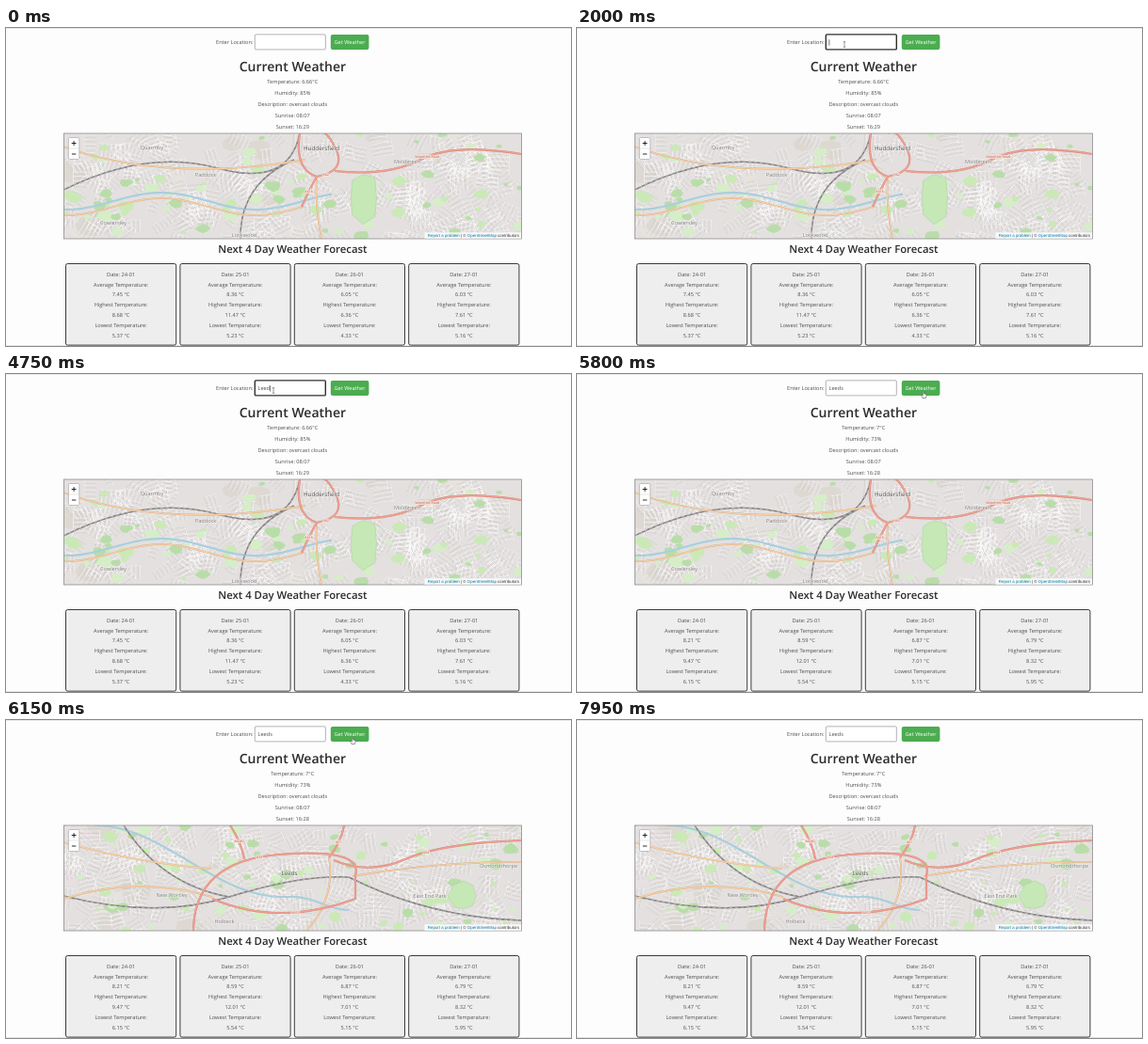
An HTML page for the animation above (8000 ms loop, 600 by 338 pixels).

```html
<!DOCTYPE html>
<html lang="en">
<head>
<meta charset="utf-8">
<title>Weather forecast</title>
<style>
html, body { margin: 0; width: 100%; height: 100%; overflow: hidden; background: #fefdfe; }
svg { display: block; width: 100vw; height: 100vh; }
text { font-family: "Open Sans", "Noto Sans", sans-serif; font-size: 5.65px; fill: #505050; text-rendering: geometricPrecision; }
.mid { text-anchor: middle; }
.head { font-weight: 600; fill: #2b2b2b; }
.place { font-size: 5.6px; fill: #777; stroke: #f4f2f1; stroke-width: .9px; paint-order: stroke; }
.city { font-size: 6.3px; fill: #444; }
.tag { font-size: 3.6px; fill: #a35b50; stroke: #fbe3da; stroke-width: 1.6px; paint-order: stroke; }
.credit { font: 4.4px "Liberation Sans", Arial, sans-serif; fill: #333; }
.link { fill: #0078a8; }
</style>
</head>
<body>
<svg id="stage" viewBox="0 0 600 338" preserveAspectRatio="none">
  <defs><clipPath id="mapClip"><rect x="61.5" y="112" width="486" height="112"/></clipPath></defs>
  <path d="M0 .4H600M0 337.5H600" stroke="#dedede" stroke-width=".8"/>
  <text x="223" y="17.3">Enter Location:</text>
  <rect id="field" x="264.3" y="6.9" width="75" height="16" rx="1" fill="#fff"/>
  <text id="typed" x="267.5" y="17.4"></text>
  <path id="caret" d="M0 12.2V18.6" stroke="#222" stroke-width=".6"/>
  <rect x="344.8" y="7" width="40.6" height="16" rx="2" fill="#4bac50"/>
  <text class="mid" x="365" y="17.3" style="fill:#fff">Get Weather</text>
  <text class="mid head" x="304.4" y="45.8" style="font-size:14px">Current Weather</text>
  <g id="current"></g>
  <g id="maps" clip-path="url(#mapClip)"></g>
  <rect x="61.5" y="112" width="486" height="112" fill="none" stroke="#8d8d8d" stroke-width=".8"/>
  <rect x="66.4" y="116.5" width="11.4" height="23" rx="1.2" fill="#fff" stroke="#b5b2b2" stroke-width=".8"/>
  <path d="M66.5 128H77.7" stroke="#ccc" stroke-width=".5"/>
  <path d="M69.7 122.5H74.5M72.1 120.1V124.9M69.9 134H74.3" stroke="#111" stroke-width=".9"/>
  <rect x="444.5" y="217.3" width="102.6" height="6.5" fill="#fff" opacity=".8"/>
  <text class="credit" x="545" y="222.2" text-anchor="end"><tspan class="link">Report a problem</tspan> | © <tspan class="link">OpenStreetMap</tspan> contributors</text>
  <text class="mid head" x="304.4" y="238.8" style="font-size:11.35px">Next 4 Day Weather Forecast</text>
  <g id="cards"></g>
  <g id="pointer"></g>
</svg>
<script>
const LOOP = 8000;
const LEFT = 61, TOP = 112, WIDTH = 487, HEIGHT = 112;
const $ = id => document.getElementById(id);
const clamp = v => Math.min(1, Math.max(0, v));
const ease = v => (1 - Math.cos(Math.PI * clamp(v))) / 2;

const reports = [
  { now: "6.66 85 16:29", days: ["7.45 8.68 5.37", "8.36 11.47 5.23", "6.05 6.36 4.33", "6.03 7.61 5.16"] },
  { now: "7 73 16:28", days: ["8.21 9.47 6.15", "8.59 12.01 5.54", "6.87 7.01 5.15", "6.79 8.32 5.95"] }
];

// Each town grows from its river's course, a few main lines and a seed.
const valley = x => 184 + 9 * Math.cos((x - 265) / 32);
const lowland = x => 112 + 76 * ease((x - 94) / 200) + 14 * ease((x - 305) / 60);

const towns = [
  {
    seed: 17, river: valley, riverSpan: [61, 350], wooded: .6, park: [379, 180, 31, 50],
    rails: ["M61 172Q150 128 225 149T312 112", "M249 224Q248 165 306 140"],
    major: [trace(x => valley(x) + 6, 61, 316), "M330 160Q328 190 335 224", "M61 126Q170 165 318 140"],
    trunk: ["M330 158Q322 172 314 190", "M349 152Q405 158 440 140T547 134", "M312 112Q306 150 330 158Q362 152 350 128T330 112"],
    tags: ["A616", "Wakefield Road", "A62"],
    city: "Huddersfield 335 130",
    places: ["Quarmby 155 129", "Paddock 212 158", "Moldgreen 426 144", "Lockwood 253 222", "Cowlersley 114 209"]
  },
  {
    seed: 43, river: lowland, riverSpan: [94, 365], wooded: .15, park: [486, 187, 30, 34],
    rails: ["M61 187Q160 212 237 188T364 167Q450 210 547 213", "M125 112Q165 175 237 188"],
    major: ["M61 130Q140 152 218 158", "M61 190Q140 165 219 188", "M368 166Q460 150 547 151", "M343 146Q350 190 319 224"],
    trunk: ["M199 224Q200 150 290 143T371 165", "M348 149Q385 165 424 148T547 128", "M238 112Q250 130 253 148", "M219 190Q290 220 371 190V165", "M343 146Q356 130 359 112"],
    tags: ["A58", "A64", "A6040", "A653", "A61"],
    city: "Leeds 301 165",
    places: ["New_Wortley 176 188", "East_End_Park 450 189", "Osmondthorpe 523 157", "Holbeck 232 216"]
  }
];

function trace(course, from, to) {
  let d = "";
  for (let x = from; x <= to; x += 5) d += `${d ? "L" : "M"}${x} ${course(x).toFixed(1)}`;
  return d;
}

function randomFrom(seed) {
  return () => (seed = seed * 16807 % 2147483647) / 2147483647;
}

const stroke = (d, color, width, extra = "") =>
  `<path d="${d}" fill="none" stroke="${color}" stroke-width="${width}" ${extra}/>`;
const label = (words, x, y, cls = "mid") => `<text class="${cls}" x="${x}" y="${y}">${words}</text>`;

function place(entry, cls) {
  const [name, x, y] = entry.split(" ");
  return label(name.replaceAll("_", " "), x, y, cls);
}

function tag(words, d) {
  const path = document.createElementNS("http://www.w3.org/2000/svg", "path");
  path.setAttribute("d", d);
  const { x, y } = path.getPointAtLength(path.getTotalLength() / 2);
  return label(words, x, y + 1.2, "mid tag");
}

function blob(rnd, x, y, w, h) {
  const corners = Array.from({ length: 8 }, (_, i) => {
    const angle = i * Math.PI / 4, r = .38 + rnd() * .22;
    return [x + Math.cos(angle) * w * r, y + Math.sin(angle) * h * r].map(v => v.toFixed(1));
  });
  return "M" + corners.join("L") + "Z";
}

function blobs(rnd, count, size, colors, yAt = () => TOP + rnd() * HEIGHT) {
  let out = "";
  for (let i = 0; i < count; i++) {
    const x = LEFT + rnd() * WIDTH, scale = size * (.4 + rnd());
    out += `<path d="${blob(rnd, x, yAt(x), scale, scale * .7)}" fill="${colors[i % colors.length]}"/>`;
  }
  return out;
}

function streets(rnd) {
  let roads = "", houses = "";
  for (let i = 0; i < 250; i++) {
    const x = LEFT + rnd() * WIDTH, y = TOP + rnd() * HEIGHT;
    const angle = rnd() * Math.PI, length = 8 + rnd() * 17, rows = 2 + rnd() * 3;
    const c = Math.cos(angle), s = Math.sin(angle), bend = rnd() * 4 - 2;
    const at = (u, v) => [x + u * c - v * s, y + u * s + v * c].map(n => n.toFixed(1));
    const row = v => `M${at(0, v)}Q${at(length / 2, v + bend)} ${at(length, v)}`;
    for (let k = 0; k < rows; k++) {
      roads += row(k * 4.6);
      houses += row(k * 4.6 + 2.2);
    }
    roads += `M${at(0, -3)}L${at(0, rows * 4.6)}`;
  }
  return stroke(houses, "#d0cac7", 1, 'stroke-dasharray="1.7 1"') +
    stroke(roads, "#cdc9c8", 1.1) + stroke(roads, "#fbfafa", .75);
}

function drawTown({ seed, river, riverSpan, wooded, park, rails, major, trunk, tags, city, places }) {
  const rnd = randomFrom(seed);
  const greens = ["#cbe9b7", "#b9dda9", "#d5eec7"];
  const course = trace(river, ...riverSpan), rail = rails.join(""), main = major.join(""), fast = trunk.join("");
  const riverside = x => rnd() < wooded && x < 330 ? river(x) + rnd() * 36 - 18 : TOP + rnd() * HEIGHT;
  return `<rect x="${LEFT}" y="${TOP}" width="${WIDTH}" height="${HEIGHT}" fill="#e3e0df"/>` +
    blobs(rnd, 24, 28, ["#e7dfe2", "#e6e2dd", "#ddd9d2"]) +
    streets(rnd) +
    blobs(rnd, 85, 12, greens, riverside) +
    `<path d="${blob(rnd, ...park)}" fill="#c5e8b6" stroke="#a5d097" stroke-width=".5"/>` +
    stroke(course, "#a9cfdd", 2.2) +
    stroke(rail, "#807d7d", 1.5) + stroke(rail, "#dedbdb", .6, 'stroke-dasharray="3 3"') +
    stroke(main, "#cfa985", 1.8) + stroke(main, "#f5cfa8", 1.3) +
    stroke(fast, "#d48578", 2.2) + stroke(fast, "#eda092", 1.6) +
    places.map(p => place(p, "mid place")).join("") + place(city, "mid place city") +
    tags.map((words, i) => tag(words, trunk[i])).join("");
}

$("maps").innerHTML = towns.map(town => `<g>${drawTown(town)}</g>`).join("");

function showReport({ now, days }) {
  const [heat, humidity, sunset] = now.split(" ");
  $("current").innerHTML = [`Temperature: ${heat}°C`, `Humidity: ${humidity}%`, "Description: overcast clouds", "Sunrise: 08:07", `Sunset: ${sunset}`]
    .map((line, i) => label(line, 304.3, 58.6 + i * 12)).join("");
  $("cards").innerHTML = days.map((day, i) => {
    const x = 63.5 + i * 121.4;
    const lines = [`Date: ${24 + i}-01`];
    day.split(" ").forEach((value, k) => lines.push(["Average", "Highest", "Lowest"][k] + " Temperature:", value + " °C"));
    return `<rect x="${x}" y="250.5" width="117.2" height="86.6" rx="2" fill="#eee" stroke="#3a3a3a"/>` +
      lines.map((line, k) => label(line, x + 58.6, 263.6 + k * 10.9)).join("");
  }).join("");
}

const shapes = {
  arrow: '<path d="M0 0V8L2 6.3L3.3 9L4.5 8.4L3.3 5.8H5.8Z" fill="#fff" stroke="#222" stroke-width=".5"/>',
  beam: '<path d="M-1.3 -2.8H1.3M0 -2.8V2.8M-1.3 2.8H1.3" fill="none" stroke="#555" stroke-width=".6"/>',
  hand: '<path d="M-.7 -2.5Q0 -3.3 .6 -2.5V0L2.6 .5Q3.3 .8 3.1 2L2.5 4.6H-1L-2.6 1.6Q-2.5 .7 -1.6 1.1L-.7 2Z" fill="#fff" stroke="#333" stroke-width=".5"/>'
};

const ENTER = 1500, FOCUS = 1900, FIRST_KEY = 3500, NEXT_KEYS = 4350, KEY_GAP = 160;
const TO_BUTTON = 5150, BLUR = 5450, REPORT = 5600, MAP = 6000, LEAVE = 7700;

function lettersAt(t) {
  if (t < NEXT_KEYS) return +(t >= FIRST_KEY);
  return Math.min(5, 2 + Math.floor((t - NEXT_KEYS) / KEY_GAP));
}

function drawField(t) {
  const focused = t >= FOCUS && t < BLUR;
  const letters = lettersAt(t);
  $("typed").textContent = "Leeds".slice(0, letters);
  $("field").setAttribute("stroke", focused ? "#303030" : "#a0a0a0");
  $("field").setAttribute("stroke-width", focused ? 1.4 : .8);
  const blinkStart = t < FIRST_KEY ? FOCUS : t < NEXT_KEYS ? FIRST_KEY : NEXT_KEYS + (letters - 2) * KEY_GAP;
  const caretOn = focused && (t - blinkStart) % 1060 < 530;
  $("caret").setAttribute("visibility", caretOn ? "visible" : "hidden");
  $("caret").setAttribute("transform", `translate(${267.9 + (letters && $("typed").getComputedTextLength())} 0)`);
}

function drawPointer(t) {
  const up = ease((t - ENTER) / 350), over = ease((t - TO_BUTTON) / 250);
  const x = 302 - 18 * up + 84 * over, y = 250 - 232.5 * up + 3.5 * over;
  const shape = y > 23 ? "arrow" : x < 339 ? "beam" : x < 345 ? "arrow" : "hand";
  $("pointer").style.display = t >= ENTER && t < LEAVE ? "" : "none";
  $("pointer").innerHTML = shapes[shape];
  $("pointer").setAttribute("transform", `translate(${x} ${y})`);
}

let shown;
function render(t) {
  const report = +(t >= REPORT);
  if (report !== shown) showReport(reports[shown = report]);
  [...$("maps").children].forEach((map, i) => map.style.display = i === +(t >= MAP) ? "" : "none");
  drawField(t);
  drawPointer(t);
}

const start = performance.now();
function tick() {
  render((performance.now() - start) % LOOP);
  requestAnimationFrame(tick);
}
tick();
</script>
</body>
</html>
```
